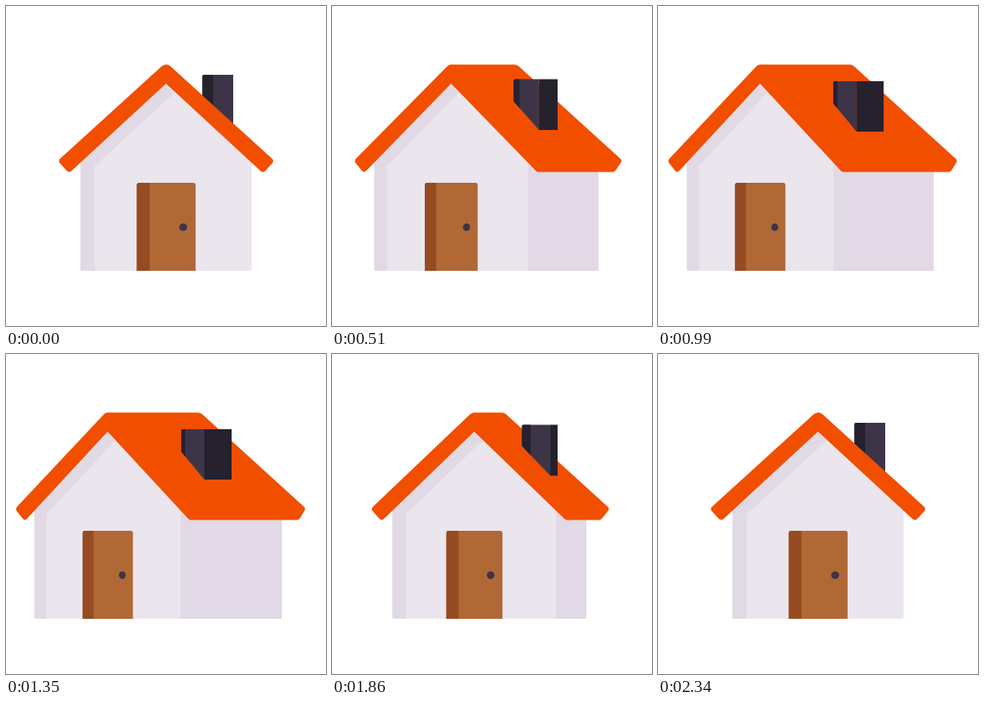
An HTML page that plays this animation: 400x400 px, repeating every 4.37 s.

```html
<!DOCTYPE html>
<html lang="en">
<head>
<meta charset="utf-8">
<title>Turning house</title>
<style>
  html, body { margin: 0; width: 100%; height: 100%; overflow: hidden; background: #fff; }
  svg { display: block; width: 100%; height: 100%; }
</style>
</head>
<body>
<svg viewBox="0 0 400 400">
  <path id="side" fill="#e1d9e5"/>
  <g id="wall">
    <path fill="#ebe5ed" d="M93 180L200 85L307 180V329Q307 331 305 331H95Q93 331 93 329Z"/>
    <path fill="#e1dae5" d="M93 180L200 85V97L211 108L111 200V331H95Q93 331 93 329Z"/>
    <path fill="#b06835" d="M163.5 331V224Q163.5 221 166.5 221H234Q237 221 237 224V331Z"/>
    <path fill="#964b22" d="M163.5 331V224Q163.5 221 166.5 221H179.5V331Z"/>
    <ellipse fill="#3d3547" cx="221.5" cy="276.5" rx="5" ry="4.8"/>
  </g>
  <path id="slope" fill="#f24e00"/>
  <path id="stack" fill="#3d3547"/>
  <path id="stackShade" fill="#25212d"/>
  <path id="stackSide" fill="#25212d"/>
  <path id="gable" fill="#f24e00" d="M82 206Q79 208.5 76 206L67 196Q65 193 68 190.5L195 75Q200 71.5 205 75L332 190.5Q335 193 333 196L324 206Q321 208.5 318 206L200 97Z"/>
</svg>
<script>
const LOOP = 4370, STEP = 30, END = 2340;
const el = id => document.getElementById(id);
const path = (id, d) => el(id).setAttribute('d', d);

// Cubic bezier easing with handles (x1, 0) and (x2, 1)
function ease(x, x1, x2) {
  if (x <= 0) return 0;
  if (x >= 1) return 1;
  let lo = 0, hi = 1, s;
  for (let i = 0; i < 30; i++) {
    s = (lo + hi) / 2;
    const r = 1 - s;
    if (3 * x1 * s * r * r + 3 * x2 * s * s * r + s * s * s < x) lo = s;
    else hi = s;
  }
  return s * s * (3 - 2 * s);
}

const turn = t => ease(t / 1110, .348, .256) - ease((t - 1490) / 850, .33, .22);

// p: 0 = seen from the front, 1 = fully turned
function draw(p) {
  const apex = 200 - 73 * p, k = 1 - .145 * p;
  const front = `translate(${apex} 0) scale(${k} 1) translate(-200 0)`;
  el('wall').setAttribute('transform', front);
  el('gable').setAttribute('transform', front);

  const corner = apex + 106 * k;
  path('side', `M${corner} 180H${306 + 39 * p}V331H${corner}Z`);

  const b = 40 * p, c = 43 * p;
  path('slope', `M${apex} 73.2H${200 + b}Q${203 + b} 73.2 ${205 + b} 75L${332 + b} 190.5
    Q${335 + b} 193 ${333 + b} 196L${324 + c} 206Q${322.5 + c} 207.5 ${320 + c} 207.5
    H${apex + 121 * k}Z`);

  const left = 245.5 - 26.5 * p, edge = 284 - 36 * p, right = Math.max(edge, 282);
  const top = 86 + 8 * p, high = 112 + 10 * p, low = 150 + 7 * p;
  const dark = 13.5 - 8.5 * p, rise = (low - high) / (edge - left);
  const face = (w, y) => `M${left} ${high}V${top + 2}Q${left} ${top} ${left + 2} ${top}H${left + w}V${y}Z`;
  path('stack', face(edge - left, low));
  path('stackShade', face(dark, high + dark * rise));
  path('stackSide', `M${edge} ${top}H${right}V${low}H${edge}Z`);
}

const start = performance.now();
function frame() {
  const t = (performance.now() - start) % LOOP;
  draw(turn(Math.min(END, Math.floor(t / STEP) * STEP)));
  requestAnimationFrame(frame);
}
frame();
</script>
</body>
</html>
```
